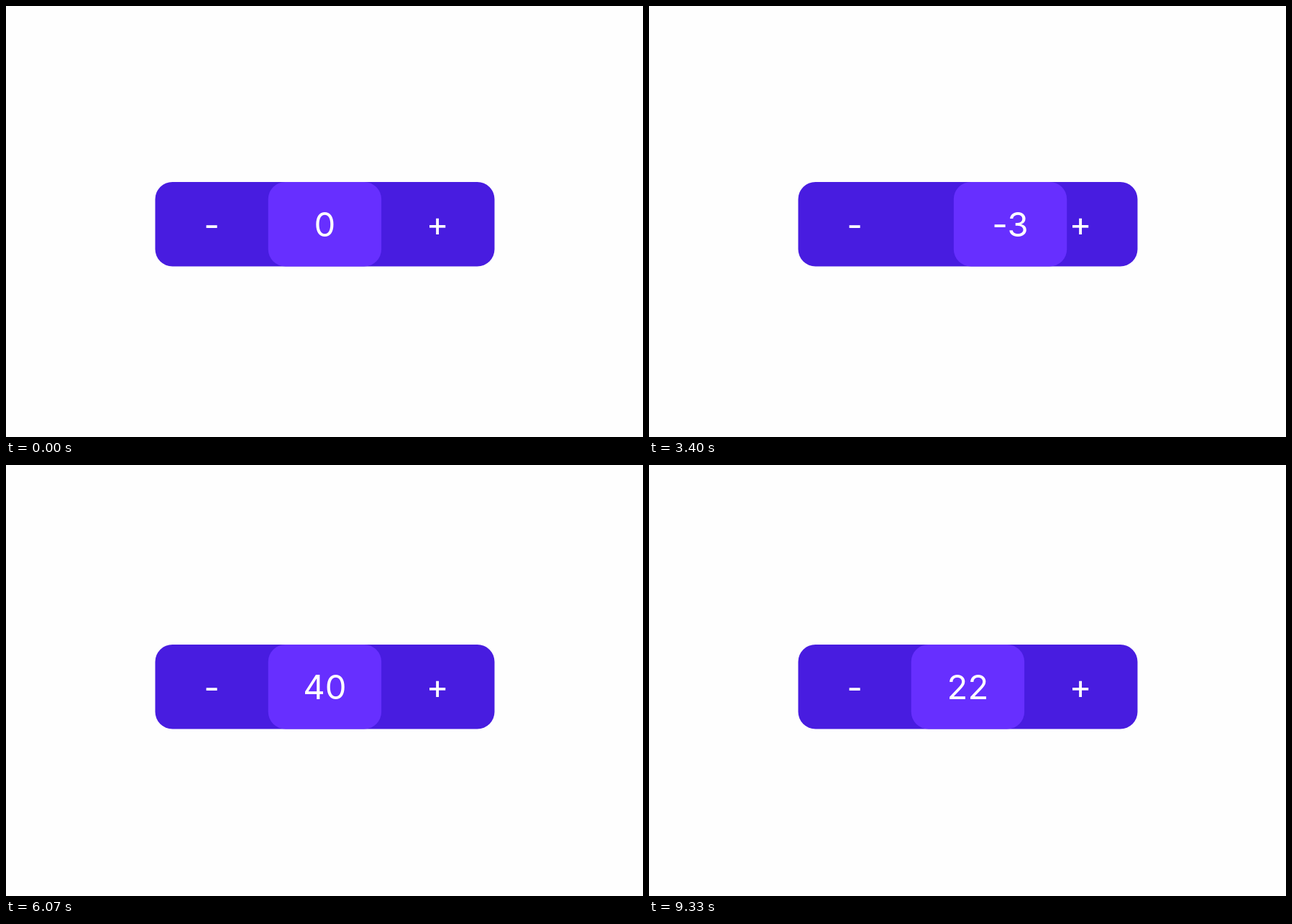
These frames come from a looping animation (886 by 600 pixels, 9.4 s). An HTML page:

```html
<!DOCTYPE html>
<html lang="en">
<head>
<meta charset="utf-8">
<title>Stepper</title>
<style>
  html, body { margin: 0; width: 100%; height: 100%; overflow: hidden; background: #fefefe; }
  svg { display: block; width: 886px; height: 600px; }
  text {
    font: 400 47.2px Inter, sans-serif;
    font-feature-settings: "calt" 0; /* keep the minus sign low beside digits */
    fill: #fff;
    text-anchor: middle;
  }
  .bar { fill: #481ce0; }
  .knob { fill: #672fff; }
</style>
</head>
<body>
<svg viewBox="0 0 886 600">
  <g id="stepper">
    <rect class="bar" x="207.5" width="472" height="117.6" rx="24"/>
    <text x="286" y="76.5">-</text>
    <text x="600" y="75.3">+</text>
    <g id="thumb">
      <rect class="knob" x="364.7" width="157.4" height="117.6" rx="24"/>
      <text id="count" x="443.4" y="76.4">0</text>
    </g>
  </g>
</svg>
<script>
  const LOOP = 9400;
  const RATE = 0.027;  // counts per ms while the thumb is held aside
  const REACH = 78.7;  // furthest thumb offset: half its width
  const LAG = 504;     // time constant of the pull
  const RETURN = 300;  // duration of the snap back

  const drags = [
    { start: 700, steps: -22 },
    { start: 2700, steps: 62 },
    { start: 6280, steps: -18 }
  ];

  const $ = id => document.getElementById(id);
  const stepper = $('stepper'), thumb = $('thumb'), count = $('count');
  const clamp = (v, max) => Math.min(Math.max(v, 0), max);
  const smooth = p => p * p * (3 - 2 * p);

  function draw(t) {
    let value = 0, offset = 0;
    for (const { start, steps } of drags) {
      const dir = Math.sign(steps), hold = Math.abs(steps) / RATE;
      const held = clamp(t - start, hold);
      const release = clamp((t - start - hold) / RETURN, 1);
      value += dir * held * RATE;
      offset += dir * REACH * (1 - Math.exp(-held / LAG)) * (1 - smooth(release));
    }
    value = Math.round(value);
    // The control sits slightly lower once the value is positive.
    stepper.setAttribute('transform', `translate(0 ${value > 0 ? 250 : 245})`);
    thumb.setAttribute('transform', `translate(${offset} 0)`);
    count.textContent = value;
  }

  const begin = performance.now();
  function tick() {
    draw((performance.now() - begin) % LOOP);
    requestAnimationFrame(tick);
  }
  tick();
</script>
</body>
</html>
```
